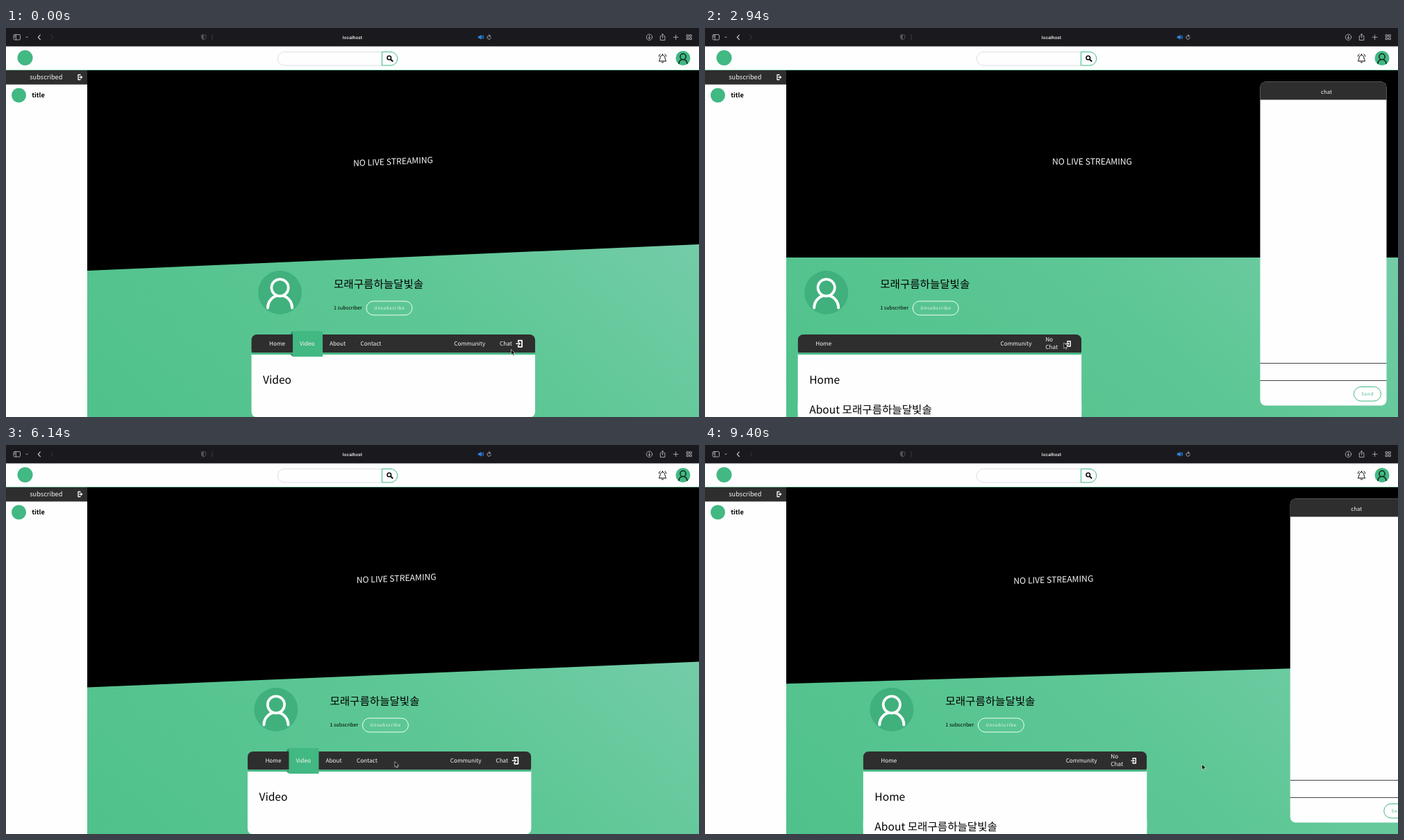
Recreate the animation shown at these times as an HTML page. Size 998x561 px, loop 9.42 s.

```html
<!DOCTYPE html>
<html lang="en">
<head>
<meta charset="utf-8">
<title>localhost</title>
<style>
  html, body { margin: 0; width: 100%; height: 100%; overflow: hidden; background: #fff; }
  svg { display: block; width: 998px; height: 561px; }
  text {
    font: 400 8.2px "Noto Sans CJK KR", "Noto Sans CJK JP", "Noto Sans", sans-serif;
    text-rendering: geometricPrecision; fill: #000;
  }
  .mid { text-anchor: middle; }
  .title { font-size: 15.6px; font-weight: 500; }
  .nav text, .light { fill: #f6f6f6; }
  .small { font-size: 6.3px; letter-spacing: .7px; }
  .line { fill: none; stroke-linecap: round; stroke-linejoin: round; }
  .green { fill: #42b883; }
  .dark { fill: #2e2e2e; }
</style>
</head>
<body>
<svg viewBox="0 0 998 561">
  <defs>
    <linearGradient id="grass" x1="0" y1="1" x2="1" y2=".35">
      <stop offset="0" stop-color="#50c18b"/>
      <stop offset=".55" stop-color="#5dc795"/>
      <stop offset="1" stop-color="#78cdab"/>
    </linearGradient>
    <g id="person" class="line">
      <path d="M-17.5 22A17.5 18 0 0 1 17.5 22"/>
      <circle cy="-7" r="12"/>
    </g>
    <g id="enter" class="line" stroke="#fff" stroke-linecap="butt">
      <path d="M2.8 2.8V.9H8V10.1H2.8V8.2" stroke-width="1.8"/>
      <path d="M0 5.5H4" stroke-width="1.6"/>
      <path d="M3.4 2.9L6.2 5.5L3.4 8.1Z" fill="#fff" stroke="none"/>
    </g>
    <clipPath id="stage"><rect x="117" y="61" width="881" height="500"/></clipPath>
    <clipPath id="bar"><path d="M353.5 471V450a8 8 0 0 1 8-8H754a8 8 0 0 1 8 8V471Z"/></clipPath>
  </defs>

  <g clip-path="url(#stage)">
    <rect x="117" y="61" width="881" height="500" fill="url(#grass)"/>
    <g id="screen">
      <rect x="100" y="-60" width="920" height="391"/>
      <text id="notice" class="mid light" x="557.5" y="197" font-weight="500"
        style="font-size:12.2px;font-weight:500">NO LIVE STREAMING</text>
    </g>

    <g id="channel">
      <circle cx="394.5" cy="381.5" r="31.5" fill="#40b07d"/>
      <use href="#person" x="394.5" y="381.5" stroke="#fff" stroke-width="4" fill="#40b07d"/>
      <circle cx="394.5" cy="374.5" r="10.2" fill="#40b07d"/>
      <text class="title" x="472" y="375">모래구름하늘달빛솔</text>
      <text x="472" y="406" style="font-size:7.2px">1 subscriber</text>
      <rect x="519" y="394" width="66" height="20" rx="10" fill="none" stroke="#f2fff8"/>
      <text class="small light" x="530" y="406">Unsubscribe</text>

      <path id="sheet" d="M353.5 465H762V553.5a8 8 0 0 1-8 8H361.5a8 8 0 0 1-8-8Z" fill="#fefefe"/>
      <g clip-path="url(#bar)">
        <rect class="dark" x="353" y="442" width="410" height="26.5"/>
        <rect class="green" x="353" y="468.3" width="410" height="3"/>
        <rect id="hover" class="green" x="699.7" y="442" width="63" height="29"/>
      </g>
      <g class="nav">
        <text x="379" y="457.8">Home</text>
        <text x="645.3" y="457.8">Community</text>
      </g>
      <g id="closedView">
        <path d="M413 437V442H409ZM413 474V470H409Z" fill="#2f8a62"/>
        <rect class="green" x="413" y="437" width="43" height="37"/>
        <g class="nav">
          <text x="423" y="457.8">Video</text>
          <text x="466" y="457.8">About</text>
          <text x="510.5" y="457.8">Contact</text>
          <text x="711" y="457.8">Chat</text>
        </g>
        <use href="#enter" x="735" y="449.7"/>
        <text class="title" x="370" y="513">Video</text>
      </g>
      <g id="openView">
        <rect x="353.5" y="540" width="408.5" height="21" fill="#fefefe"/>
        <g class="nav">
          <text x="710" y="452.3">No</text>
          <text x="710" y="463.2">Chat</text>
        </g>
        <use href="#enter" transform="translate(739.6 451) scale(.8)"/>
        <text class="title" x="370" y="513">Home</text>
        <text class="title" x="370" y="555.5">About 모래구름하늘달빛솔</text>
      </g>
    </g>

    <g id="chat">
      <rect x="799.5" y="77.5" width="182" height="467" rx="8" fill="#fefefe"/>
      <path class="dark" d="M799.5 103.5V85.5a8 8 0 0 1 8-8H973.5a8 8 0 0 1 8 8V103.5Z"/>
      <text class="mid light" x="895" y="95" style="font-size:7.8px;font-weight:500">chat</text>
      <path d="M799.5 483.5H981.5M799.5 508.5H981.5" stroke="#444"/>
      <rect x="934.5" y="517.5" width="39" height="20.5" rx="10.2" fill="none" stroke="#42b883"/>
      <text class="small mid green" x="954.2" y="530" style="fill:#42b883">Send</text>
    </g>
  </g>

  <!-- sidebar -->
  <rect y="61" width="116.5" height="500" fill="#fefefe"/>
  <rect class="dark" y="61" width="117" height="20.5"/>
  <text class="light" x="34.3" y="74" style="font-size:9.2px;font-weight:500">subscribed</text>
  <g class="line" stroke="#fff" stroke-width="1.3">
    <path d="M107 67.5H104V74.5H107M106 71H109.3"/>
    <path d="M108 69L110.2 71L108 73Z" fill="#fff" stroke-width=".4"/>
  </g>
  <circle class="green" cx="18.5" cy="97" r="10.5"/>
  <text x="37.2" y="100" style="font-size:9.1px;font-weight:700">title</text>

  <!-- page header -->
  <rect y="26" width="998" height="34.5" fill="#fefefe"/>
  <rect y="60" width="998" height="1" fill="#8fd6b5"/>
  <circle class="green" cx="27.5" cy="43" r="11"/>
  <path d="M541.5 34.5H401a9.7 9.7 0 0 0 0 19.5H541.5" fill="#fefefe" stroke="#dedfe3"/>
  <path d="M541.5 34.5H554a9.7 9.7 0 0 1 0 19.5H541.5Z" fill="#fefefe" stroke="#42b883"/>
  <g class="line" stroke="#000">
    <circle cx="551.8" cy="43" r="2.8" stroke-width="1.5"/>
    <path d="M554 45.3L556.6 47.8" stroke-width="1.9"/>
    <path d="M940.5 47.5C942.5 45.5 941.5 39 945.5 39S948.5 45.5 950.5 47.5ZM944.3 49.5Q945.5 51 946.7 49.5M945.5 38.8V37.6M940.3 41Q940.5 38.8 942 37.8M950.7 41Q950.5 38.8 949 37.8" stroke-width="1"/>
  </g>
  <circle class="green" cx="975" cy="43.5" r="10.5"/>
  <use href="#person" transform="translate(975 43.8) scale(.34)" stroke="#10241b" stroke-width="4.6" fill="none"/>
  <circle class="green" cx="975" cy="41.4" r="3.2"/>

  <!-- browser bar -->
  <rect width="998" height="26.5" fill="#1a1a1e"/>
  <text class="mid" x="499" y="15.6" style="font:600 6.4px Inter,sans-serif;fill:#f0f0f0">localhost</text>
  <g class="line" stroke="#b4b4b8" stroke-width=".9">
    <rect x="11" y="9.5" width="9.5" height="7.5" rx="1.4"/>
    <path d="M14.3 9.5V17M12.2 11.3H13.1M12.2 13H13.1"/>
    <path d="M28.8 12.8L30 14L31.2 12.8"/>
    <path d="M49.3 10L46.3 13.3L49.3 16.6" stroke="#e0e0e2" stroke-width="1.1"/>
    <path d="M64.7 10L67.7 13.3L64.7 16.6M297 9.5V17" stroke="#414146"/>
    <path d="M284.7 9.5L288 10.5V13.5Q288 16 284.7 17.2Q281.5 16 281.5 13.5V10.5Z" stroke="#55555a"/>
    <path d="M284.7 9.5V17.2Q281.5 16 281.5 13.5V10.5Z" fill="#55555a" stroke="none"/>
    <path d="M680.5 12H682L684.2 10.2V16.2L682 14.5H680.5Z" fill="#2f8cf0" stroke="#2f8cf0" stroke-width=".6"/>
    <path d="M685.6 11.6Q686.7 13.2 685.6 14.8M687 10.7Q688.6 13.2 687 15.7" stroke="#2f8cf0"/>
    <path d="M697.8 11.8A2.7 2.7 0 1 0 698.4 13.8M695.8 9.6L697.6 11.4L695.5 12.6"/>
    <circle cx="926.5" cy="13.3" r="4.2"/>
    <path d="M926.5 11V15.4M924.8 13.8L926.5 15.5L928.2 13.8"/>
    <path d="M943.7 11.7H942.3V17.5H948.9V11.7H947.5M945.6 14.3V8.6M944 10.1L945.6 8.5L947.2 10.1"/>
    <path d="M961.3 13.3H967.9M964.6 10V16.6"/>
    <path d="M980.5 9.8H983V12.3H980.5ZM984.8 9.8H987.3V12.3H984.8ZM980.5 14.1H983V16.6H980.5ZM984.8 14.1H987.3V16.6H984.8Z"/>
  </g>

  <g id="cursor">
    <path id="arrow" d="M0 0V8L1.8 6.3L3 9.1L4.3 8.5L3.1 5.8H5.6Z" fill="#000" stroke="#fff" stroke-width=".6"/>
    <path id="beam" class="line" d="M-1.8-3.5Q0-3.5 0-2.5Q0-3.5 1.8-3.5M0-2.5V4.5M-1.8 5.5Q0 5.5 0 4.5Q0 5.5 1.8 5.5" stroke="#e6efea" stroke-width=".9"/>
  </g>
</svg>
<script>
  const LOOP = 9420, SHIFT = 219.8, TILT = 2.47;
  const $ = id => document.getElementById(id);
  const clamp = v => Math.min(1, Math.max(0, v));

  function bezier(x1, y1, x2, y2) {
    const at = (a, b, s) => 3 * (1 - s) ** 2 * s * a + 3 * (1 - s) * s * s * b + s ** 3;
    return x => {
      let lo = 0, hi = 1;
      for (let i = 0; i < 24; i++) {
        const s = (lo + hi) / 2;
        if (at(x1, x2, s) < x) lo = s; else hi = s;
      }
      return at(y1, y2, lo);
    };
  }
  const ease = bezier(.25, .1, .25, 1);
  const glide = bezier(.35, .2, .65, .8);
  const linear = x => x;
  const quint = x => 1 - (1 - x) ** 5;

  // each part: [easing, duration] for opening and for closing
  const parts = {
    page: [[ease, 1000], [ease, 1000]],
    tilt: [[glide, 1000], [ease, 1000]],
    text: [[linear, 1040], [ease, 1090]],
    chat: [[quint, 1255], [ease, 700]]
  };
  const clicks = [[-3000, false], [1310, true], [5345, false], [9070, true]];
  const hovers = [[200, 2150], [3000, 5400], [7640, 9080]];
  // time, x, y of the pointer
  const path = [
    [0, 727.5, 463.5], [250, 729.2, 463.5], [2150, 729.2, 463.5], [3050, 515, 454],
    [5400, 515, 454], [5950, 560, 456.5], [6500, 560, 456.5], [7600, 715.7, 460.3], [LOOP, 715.7, 460.3]
  ];

  const move = (id, x, y = 0) => $(id).setAttribute('transform', `translate(${x} ${y})`);
  const show = (id, on) => { $(id).style.display = on ? '' : 'none'; };

  function pointer(t) {
    const i = path.findIndex(p => p[0] > t), a = path[i - 1], b = path[i];
    const k = ease((t - a[0]) / (b[0] - a[0]));
    return [a[1] + (b[1] - a[1]) * k, a[2] + (b[2] - a[2]) * k];
  }

  function draw(t) {
    const [start, open] = clicks.filter(c => c[0] <= t).pop();
    const amount = name => {
      const [fn, time] = parts[name][open ? 0 : 1];
      const k = fn(clamp((t - start) / time));
      return open ? k : 1 - k;
    };
    const page = amount('page');
    move('channel', -SHIFT * page);
    move('notice', SHIFT * (amount('text') - page));
    move('chat', 200 * (1 - amount('chat')));
    const angle = -TILT * (1 - amount('tilt'));
    $('screen').setAttribute('transform', `translate(557.5 0) skewY(${angle}) translate(-557.5 0)`);
    show('openView', open);
    show('closedView', !open);

    const glow = hovers.map(([on, off]) => Math.min(clamp((t - on) / 250), clamp(1 - (t - off) / 250)));
    $('hover').style.opacity = Math.max(...glow);
    const beam = t > 7500 && t < 8950;
    show('beam', beam);
    show('arrow', !beam);
    move('cursor', ...pointer(t));
  }

  const begin = performance.now();
  function tick() {
    draw((performance.now() - begin) % LOOP);
    requestAnimationFrame(tick);
  }
  tick();
</script>
</body>
</html>
```
